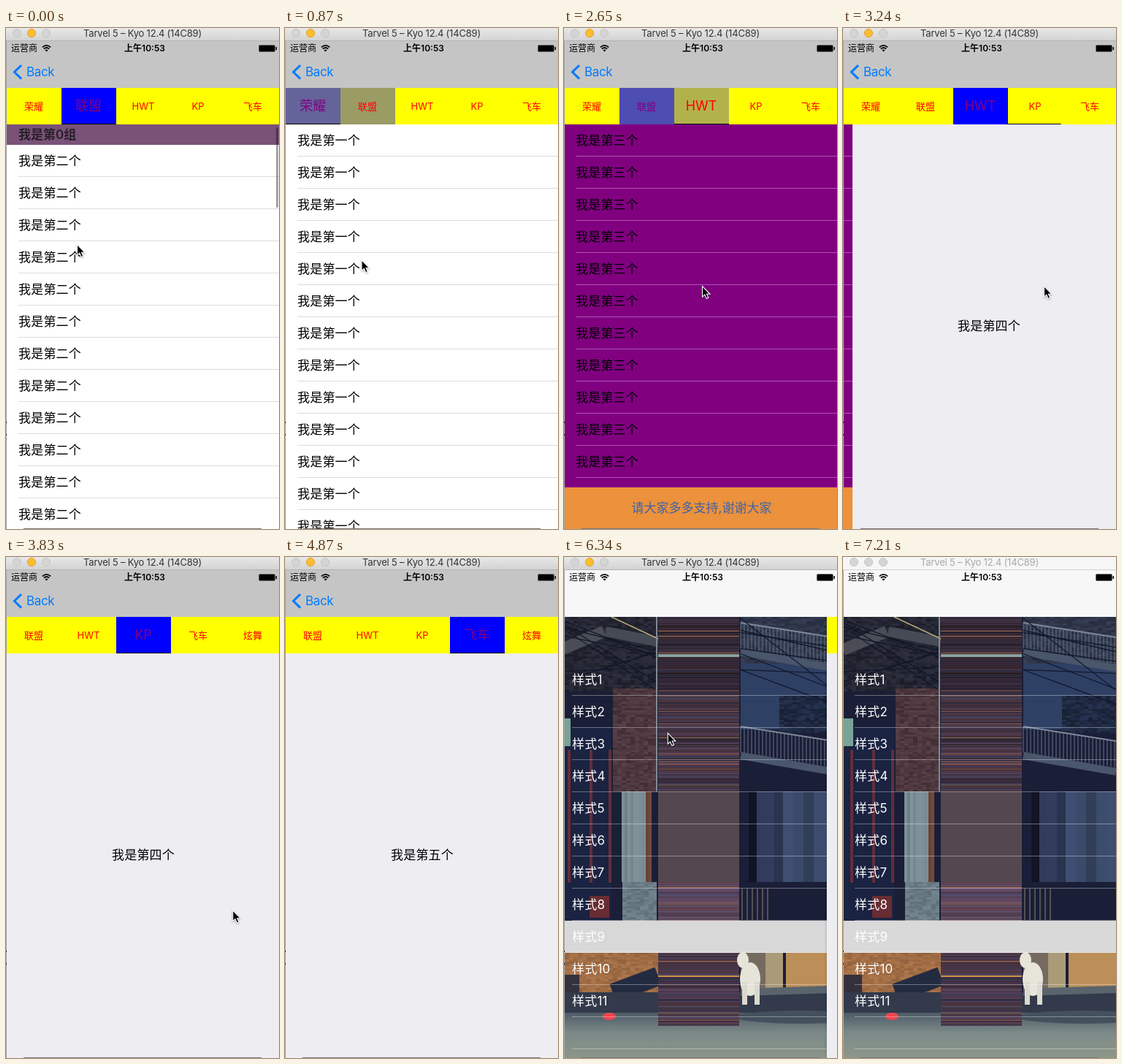
Recreate the animation shown at these times as an HTML page with a canvas. Size 374x686 px, loop 7310 ms.

```html
<!DOCTYPE html>
<html lang="zh-CN">
<head>
<meta charset="utf-8">
<title>Tab pages</title>
<style>
html, body { margin: 0; width: 100%; height: 100%; overflow: hidden; background: #fff; }
body { font: 17px/20px Inter, "Noto Sans CJK SC", "Noto Sans CJK", sans-serif; color: #000; }
#stage { position: absolute; left: 0; top: 0; width: 374px; height: 686px; overflow: hidden; background: #f7f7f7; }
#stage div, #stage canvas, #stage svg { position: absolute; white-space: nowrap; box-sizing: border-box; }
.clip { overflow: hidden; }
.mid { text-align: center; }
.row { letter-spacing: .2px; }
.head { font-weight: 600; padding-left: 16px; color: #272027; }
.tab { text-align: center; padding-right: 1px; color: #f00; background: #ff0; }
.dot { border-radius: 50%; border: 1px solid #c2c2c2; }
.status { font-size: 12px; }
.blue { color: #007aff; letter-spacing: -.35px; }
.caption { font-size: 13px; letter-spacing: -.2px; text-align: center; }
</style>
</head>
<body>
<div id="stage"></div>
<script>
const LOOP = 7310, STEP = 147.3, W = 375;
const stage = document.getElementById('stage');

function box(parent, x, y, w, h, bg, text = '', cls = '') {
  const d = document.createElement('div');
  d.className = cls;
  d.style.cssText = `left:${x}px;top:${y}px;width:${w}px;height:${h}px;line-height:${h}px;`;
  if (bg) d.style.background = bg;
  d.textContent = text;
  parent.append(d);
  return d;
}
function svg(parent, x, y, w, h, body) {
  const d = box(parent, x, y, w, h);
  d.innerHTML = `<svg width="${w}" height="${h}" style="left:0;top:0;overflow:visible">${body}</svg>`;
  return d;
}
function rows(parent, count, x, y, line, label) {
  for (let i = 0; i < count; i++) {
    box(parent, x, y + i * 44, 200, 44, '', label(i), 'row');
    box(parent, x, y + i * 44 + 43, W, 1, line);
  }
}

// ---- street photo, simplified; y counts from the top of the photo ----
function paintStreet(canvas) {
  const c = canvas.getContext('2d');
  let seed = 7;
  const rnd = () => (seed = seed * 16807 % 2147483647) / 2147483647;
  // random tone around hue, saturation and lightness
  const tone = (h, s, l, spread) => `hsl(${h},${s}%,${l + (rnd() - .5) * spread}%)`;
  const rect = (x, y, w, h, col) => { c.fillStyle = col; c.fillRect(x, y, w, h); };
  const line = (col, w, x1, y1, x2, y2) => {
    c.strokeStyle = col; c.lineWidth = w;
    c.beginPath(); c.moveTo(x1, y1); c.lineTo(x2, y2); c.stroke();
  };
  const blob = (x, y, rx, ry, col) => {
    c.fillStyle = col;
    c.beginPath(); c.ellipse(x, y, rx, ry, 0, 0, 7); c.fill();
  };
  const bricks = (x, y, w, h, hue, sat, light) => {
    for (let j = 0; j < h; j += 3)
      for (let i = 0; i < w; i += 6) rect(x + i, y + j, Math.min(6, w - i), 3, tone(hue, sat, light, 9));
  };
  const stripes = (x, w, hue, sat, light, size) => {
    for (let i = 0; i < w; i += size) rect(x + i, 239, Math.min(size, w - i), 124, tone(hue, sat, light, 9));
  };
  const streaks = (y1, y2, light) => {
    for (let y = y1; y < y2; y++)
      rect(134, y, 111, 1, rnd() < .04 ? tone(22, 35, 42, 14) : tone(235 + rnd() * 115, 17, light, 13));
  };
  const balcony = y => {
    for (let x = 247; x < 374; x += 5) line('#66738a', 1, x, y + (x - 247) * .16, x, y + 36 + (x - 247) * .16);
    line('#7d889b', 2, 247, y, 374, y + 20);
    line('#49566c', 10, 247, y + 40, 374, y + 62);
  };

  rect(0, 0, 430, 604, '#1a1e36');

  // left house
  bricks(0, 0, 134, 100, 232, 17, 17);
  line('#4a4d55', 16, 0, 45, 60, 20);
  line('#454a55', 14, 62, 20, 134, 34);
  bricks(72, 98, 60, 141, 340, 17, 26);
  rect(0, 150, 70, 266, '#1a2341');
  rect(0, 139, 14, 38, '#78a398');
  for (const x of [10, 40, 66]) rect(x, 182, 4, 182, '#632d3b');
  stripes(84, 33, 197, 11, 52, 4);
  stripes(117, 8, 15, 32, 34, 4);
  bricks(85, 363, 47, 53, 200, 11, 46);
  rect(40, 382, 27, 30, '#682c33');

  // right house
  bricks(247, 0, 127, 64, 224, 22, 24);
  rect(247, 64, 127, 90, '#2e4064');
  bricks(300, 108, 74, 50, 222, 36, 19);
  balcony(8);
  balcony(150);
  stripes(247, 22, 234, 35, 12, 11);
  stripes(269, 36, 226, 30, 24, 12);
  stripes(305, 69, 220, 29, 30, 14);
  for (let i = 0; i < 6; i++) line('#8f8473', 1, 249 + i * 7, 372, 249 + i * 7, 415);

  // cables
  for (let i = 0; i < 14; i++) {
    const x = i % 2 * 247;
    line('#0f1428', 1.2, x, rnd() * 90, x + 130, 30 + rnd() * 100);
  }
  line('#b9a979', 1.5, 70, 0, 134, 30);
  line('#7f8c97', 2, 132, 0, 132, 239);

  // street level
  bricks(0, 460, 134, 54, 26, 40, 45);
  rect(0, 490, 26, 30, '#34313c');
  line('#232b40', 26, 72, 515, 134, 492);
  rect(247, 460, 34, 50, '#746a60');
  rect(281, 460, 24, 50, '#ab9b78');
  rect(309, 460, 65, 50, '#bd8f58');
  rect(0, 514, 430, 34, '#323a4b');
  line('#59646c', 10, 247, 514, 374, 510);
  const ground = c.createLinearGradient(0, 540, 0, 604);
  ground.addColorStop(0, '#4b5864');
  ground.addColorStop(.45, '#7b8988');
  ground.addColorStop(1, '#8e9789');
  rect(0, 542, 430, 62, ground);
  blob(330, 548, 90, 9, '#44515d');
  blob(67, 547, 9, 5, '#f1454e');

  // smeared middle
  streaks(0, 100, 19);
  streaks(100, 239, 25);
  rect(134, 51, 111, 4, '#8da2a0');
  rect(134, 239, 111, 124, '#55474e');
  streaks(363, 416, 33);
  streaks(460, 560, 26);
  rect(134, 491, 111, 2, '#d5924b');

  // white dog
  blob(250, 470, 8, 11, '#e7e5da');
  blob(260, 496, 14, 23, '#e7e5da');
  for (const x of [249, 266]) rect(x, 500, 7, 31, '#dcdad0');
}

// ---- root list ----
const root = box(stage, 1, 82, 430, 604, '', '', 'clip');
const canvas = document.createElement('canvas');
canvas.width = 430; canvas.height = 604;
canvas.style.cssText = 'left:-1px;top:0';
root.append(canvas);
paintStreet(canvas);
box(root, 0, 416, 430, 44, '#d9d9d9');
const list = box(root, 0, 0, 430, 604);
list.style.color = '#fff';
rows(list, 12, 15, 64, 'rgba(255,255,255,.35)', i => i < 11 ? '样式' + (i + 1) : '');
const shade = box(root, 0, 0, 430, 604, '#000');

// ---- pushed screen ----
const push = box(stage, 1, 82, W, 604, '#eeedf2', '', 'clip');
push.style.boxShadow = '-1px 0 3px rgba(0,0,0,.15)';
const strip = box(push, 0, 50, W * 5, 554);
const page = (i, bg) => box(strip, i * W, 0, W, 554, bg, '', 'clip');

const first = page(0, '#fff');
rows(first, 13, 16, 0, '#dcdcde', () => '我是第一个');
const second = page(1, '#fff');
rows(second, 12, 16, 28, '#dcdcde', () => '我是第二个');
box(second, 0, 0, W, 28, '#7a5278', '我是第0组', 'head');
const thumb = box(second, 369, 4, 3, 110, 'rgba(0,0,0,.36)');
thumb.style.borderRadius = '2px';
const third = page(2, '#800080');
rows(third, 11, 15, 0, '#b350b3', () => '我是第三个');
box(third, 0, 497, W, 57, '#ec913c', '请大家多多支持,谢谢大家', 'mid').style.color = '#3d63a8';
['我是第四个', '我是第五个'].forEach((s, i) =>
  box(page(3 + i, '#eeedf2'), 0, 266, W - 1, 20, '', s, 'mid row'));

const bar = box(push, 0, 0, 450, 50, '#ff0');
const tabs = ['荣耀', '联盟', 'HWT', 'KP', '飞车', '炫舞'].map((s, i) =>
  box(bar, i * 75, 0, 75, 50, '', s, 'tab'));
const underline = box(bar, 0, 49, 75, 1, '#000');

// ---- navigation and status bars ----
const nav = box(stage, 0, 18, 374, 64, '#f7f7f7', '', 'clip');
const grey = box(nav, 0, 0, 374, 64, '#c5c5c5');
box(grey, -36, 0, 18, 64, '#e6e6e6');
box(grey, -18, 0, 18, 64, '#d3d3d3');
const chevron = svg(nav, 0, 0, 30, 64,
  '<path d="M21 33 11.5 42.3 21 51.6" fill="none" stroke="#007aff" stroke-width="3"/>');
const back = box(nav, 28, 32, 50, 20, '', 'Back', 'blue');
box(nav, 7, 0, 50, 20, '', '运营商', 'status');
svg(nav, 49, 5, 13, 10, `<g fill="none" stroke="#000" stroke-width="1.7">
  <path d="M.8 3.4Q6.5-1.6 12.2 3.4M2.8 5.7Q6.5 2.3 10.2 5.7"/></g><path d="M4.4 7.3Q6.5 5.6 8.6 7.3L6.5 9.6Z"/>`);
box(nav, 140, 0, 100, 20, '', '上午10:53', 'status mid').style.fontWeight = 600;
svg(nav, 346, 5, 26, 10, `<rect x=".5" y=".5" width="22" height="9" rx="1.5" stroke="#666"/>
  <path d="M23.5 3h1.5v4h-1.5z"/>`);

// ---- window frame ----
const title = box(stage, 0, 0, 374, 18);
const dots = [9, 29, 49].map(x => box(title, x, 1, 12, 12, '', '', 'dot'));
const caption = box(title, 0, 0, 374, 15, '', 'Tarvel 5 – Kyo 12.4 (14C89)', 'caption');
box(stage, 0, 18, 1, 668, '#a6a6a6');
for (const y of [539, 556]) box(stage, 0, y, 1, 2, '#222');
box(stage, 24, 685, 326, 1, '#77777a');
const cursor = svg(stage, 0, 0, 12, 19, `<path d="M.5.5V15.2L3.8 12.2 6.2 17.6 8.8 16.5 6.5 11.3H11Z"
  stroke="#fff" stroke-width="1.1" style="filter:drop-shadow(0 1px 1px rgba(0,0,0,.35))"/>`);

// ---- motion, timed in screen steps ----
const SWIPES = [{ at: 1, by: -1 }, { at: 7.6, by: 1 }, { at: 15, by: 1 }, { at: 20, by: 1 }, { at: 27, by: 1 }];
const MOUSE = [[0, 97, 296], [12, 115, 347], [18, 189, 353], [22, 275, 353], [32, 363, 679],
  [37, 27, 69], [40, 35, 88], [41, 52, 97], [48, 366, 600]];

const ramp = (n, from, len) => Math.max(0, Math.min(1, (n - from) / len));
const ease = u => 1 - (1 - u) ** 3.1;
const total = progress => SWIPES.reduce((sum, s) => sum + s.by * progress(s.at), 1);
const move = (e, x, y = 0) => e.style.transform = `translate(${x}px,${y}px)`;

function moveCursor(n) {
  const j = Math.max(1, MOUSE.findIndex(p => p[0] >= n));
  const [n0, x0, y0] = MOUSE[j - 1], [n1, x1, y1] = MOUSE[j];
  const u = ramp(n, n0, n1 - n0);
  move(cursor, x0 + (x1 - x0) * u, y0 + (y1 - y0) * u);
}

function draw(t) {
  const n = Math.min(49, Math.floor((t + 12) / STEP));
  const pos = total(at => ease(ramp(n, at, 3)));
  const tint = total(at => ramp(n, at + 2, 3.3)); // colours trail the swipe
  const picked = total(at => n >= at + 3 ? 1 : 0);
  const k = ease(ramp(n, 40, 4.72)), pop = k * W;

  move(strip, Math.round(-pos * W));
  move(bar, -75 * ramp(n, 23, 2));
  move(underline, pos * 75);
  tabs.forEach((tab, i) => {
    const w = Math.max(0, 1 - Math.abs(i - tint)), y = Math.round(255 * (1 - w));
    tab.style.background = `rgb(${y},${y},${255 - y})`;
    tab.style.color = w > .5 ? '#800080' : '#f00';
    tab.style.fontSize = i === picked ? '18px' : '13px';
  });
  thumb.style.opacity = 1 - ramp(n, 0, 3);

  move(push, Math.round(pop));
  push.style.visibility = k < 1 ? 'visible' : 'hidden';
  move(list, Math.round(-112 * (1 - k)));
  move(canvas, Math.round(-112 * (1 - k)));
  shade.style.opacity = .1 * (1 - k);
  move(grey, pop * 1.73);
  move(back, pop * .29);
  back.style.opacity = Math.max(0, 1 - k * 1.5);
  chevron.style.opacity = Math.max(0, 1 - k * 1.78);

  const idle = n === 49;
  title.style.background = idle ? '#f6f6f6' : 'linear-gradient(#e8e8e8,#d3d3d3)';
  title.style.borderBottom = `1px solid ${idle ? '#d4d4d4' : '#b3b3b3'}`;
  caption.style.color = idle ? '#a8a8a8' : '#333';
  dots.forEach((d, i) => {
    const lit = i === 1 && !idle;
    d.style.background = lit ? '#fdbd30' : '#d5d5d5';
    d.style.borderColor = lit ? '#dfa023' : '#c4c4c4';
  });
  if (!idle) moveCursor(n);
  cursor.style.visibility = (n > 32 && n < 37) || idle ? 'hidden' : 'visible';
}

const start = performance.now();
function tick() {
  draw((performance.now() - start) % LOOP);
  requestAnimationFrame(tick);
}
tick();
</script>
</body>
</html>
```
